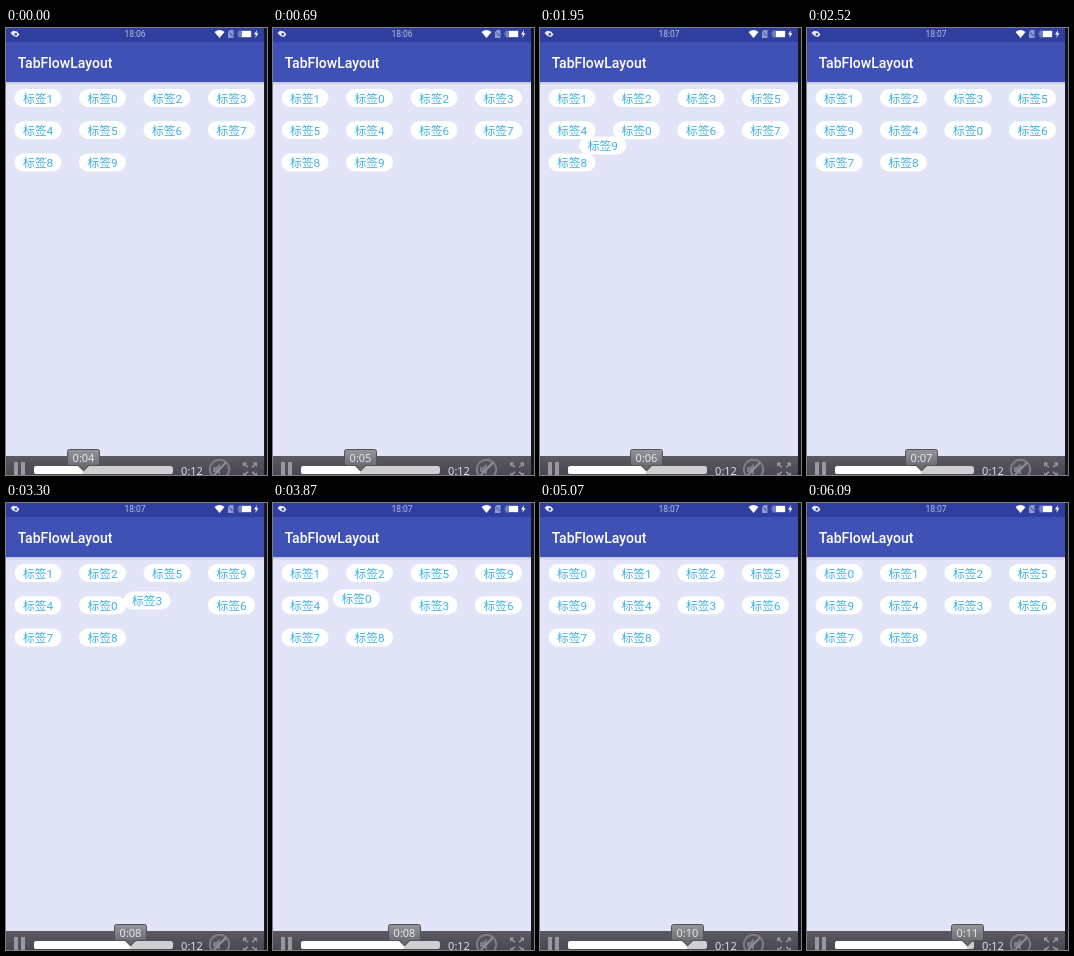
Write an HTML page with a canvas that moves like this. It is 261x447 px and loops after 6120 ms.

```html
<!DOCTYPE html>
<html lang="zh">
<head>
<meta charset="utf-8">
<title>TabFlowLayout</title>
<style>
html, body { margin: 0; width: 100%; height: 100%; overflow: hidden; background: #e1e5f7; }
canvas { display: block; width: 261px; height: 447px; }
</style>
</head>
<body>
<canvas id="stage"></canvas>
<script>
const W = 261, H = 447, LOOP = 6120;
const canvas = document.getElementById('stage');
const dpr = window.devicePixelRatio || 1;
canvas.width = Math.round(W * dpr);
canvas.height = Math.round(H * dpr);
const ctx = canvas.getContext('2d');
ctx.scale(dpr, dpr);

const CJK = 'Roboto, "Noto Sans CJK SC", "Noto Sans CJK", sans-serif';
const START = [1, 0, 2, 3, 4, 5, 6, 7, 8, 9];
// Each drag: tag, target slot, moment the others make room, path as [ms, x, y].
const DRAGS = [
  { tag: 5, to: 4, swap: 270, path: [[120, 96.5, 102], [480, 32, 102]] },
  { tag: 0, to: 5, swap: 920, path: [[720, 96.5, 70], [1220, 96.5, 102]] },
  { tag: 9, to: 4, swap: 1960, path: [[1620, 96.5, 134.4], [2260, 32, 102]] },
  { tag: 3, to: 6, swap: 3010, path: [[2760, 161, 70], [3080, 140, 94], [3300, 141, 97.5], [3480, 161, 102]] },
  { tag: 0, to: 0, swap: 3990, path: [[3720, 96.5, 102], [4240, 32, 70]] }
];
const SEEK = [[0, 77.5], [1380, 97.5], [2520, 114.6], [3300, 124.6], [4380, 137.5], [5070, 147.5], [6090, 160.5], [6120, 160.8]];

const clamp = v => Math.max(0, Math.min(1, v));
const smooth = v => v * v * (3 - 2 * v);
const mix = (a, b, k) => a + (b - a) * k;
const slot = i => ({ x: 32 + (i % 4) * 64.5, y: 70 + Math.floor(i / 4) * 32.2 });

let order = START;
for (const d of DRAGS) {
  d.before = order;
  order = order.filter(n => n !== d.tag);
  order.splice(d.to, 0, d.tag);
  d.after = order;
}

// Value list at time t along keyed points; ease shapes each span.
function along(points, t, ease) {
  if (t <= points[0][0]) return points[0].slice(1);
  for (let i = 1; i < points.length; i++) {
    const a = points[i - 1], b = points[i];
    if (t <= b[0]) {
      const k = ease((t - a[0]) / (b[0] - a[0]));
      return a.slice(1).map((v, j) => mix(v, b[j + 1], k));
    }
  }
  return points[points.length - 1].slice(1);
}

function rect(x, y, w, h, color) {
  ctx.fillStyle = color;
  ctx.fillRect(x, y, w, h);
}

function round(x, y, w, h, r, color) {
  ctx.beginPath();
  ctx.roundRect(x, y, w, h, r);
  ctx.fillStyle = color;
  ctx.fill();
}

function poly(points, color) {
  ctx.beginPath();
  points.forEach(p => ctx.lineTo(p[0], p[1]));
  ctx.closePath();
  ctx.fillStyle = color;
  ctx.fill();
}

function line(points, color, width) {
  ctx.beginPath();
  points.forEach(p => ctx.lineTo(p[0], p[1]));
  ctx.strokeStyle = color;
  ctx.lineWidth = width;
  ctx.stroke();
}

function text(str, x, y, font, color, align = 'center') {
  ctx.font = font;
  ctx.textAlign = align;
  ctx.fillStyle = color;
  ctx.fillText(str, x, y);
}

function fade(y0, y1, a, b) {
  const g = ctx.createLinearGradient(0, y0, 0, y1);
  g.addColorStop(0, a);
  g.addColorStop(1, b);
  return g;
}

function statusBar(t) {
  rect(0, 0, W, 14, '#303f9f');
  poly([[4.5, 5], [7, 2.8], [11, 3.6], [13.5, 6.5], [11, 9], [7.5, 8]], '#e8ebfa');
  ctx.beginPath();
  ctx.arc(9.8, 6.2, 1.2, 0, 7);
  ctx.fillStyle = '#303f9f';
  ctx.fill();

  text(t < 900 ? '18:06' : '18:07', 129, 9.3, '8.5px ' + CJK, '#b9c0e4');

  ctx.beginPath();
  ctx.moveTo(213.5, 10);
  ctx.lineTo(208.5, 4);
  ctx.quadraticCurveTo(213.5, 0, 218.5, 4);
  ctx.closePath();
  ctx.fillStyle = '#fff';
  ctx.fill();

  poly([[222, 4], [224, 2], [227.5, 2], [227.5, 10], [222, 10]], '#8d99cf');
  line([[223.5, 4.5], [226.5, 8]], '#303f9f', 1);
  round(232.5, 2.5, 13, 7, 1, '#7482c4');
  rect(236, 3, 9, 6, '#fff');
  rect(231.5, 4.5, 1, 3, '#7482c4');
  poly([[251, 2], [248, 6.5], [250, 6.5], [249.3, 10], [252.4, 5.2], [250.5, 5.2]], '#fff');
}

function header(t) {
  rect(0, 14, W, 40, '#3f51b5');
  statusBar(t);
  text('TabFlowLayout', 11.7, 39.5, '500 14px Roboto, sans-serif', '#fff', 'left');
  rect(0, 54, W, 3, fade(54, 57, 'rgba(90,90,110,.24)', 'rgba(90,90,110,0)'));
}

function pill(n, x, y) {
  round(x - 23.5, y - 9, 47, 18, 9, '#fff');
  text('标签' + n, x, y + 4.7, '11.8px ' + CJK, '#3fb3df');
}

function tags(t) {
  let cur = DRAGS[0];
  for (const d of DRAGS) if (t >= d.path[0][0]) cur = d;
  const k = 1 - Math.pow(1 - clamp((t - cur.swap) / 220), 2);
  for (const n of START) {
    if (n === cur.tag) continue;
    const a = slot(cur.before.indexOf(n)), b = slot(cur.after.indexOf(n));
    pill(n, mix(a.x, b.x, k), mix(a.y, b.y, k));
  }
  pill(cur.tag, ...along(cur.path, t, smooth));
}

function icons() {
  const grey = '#9a979f', dim = '#7f7c85';
  rect(8, 434, 4, 13, grey);
  rect(15, 434, 4, 13, grey);

  ctx.beginPath();
  ctx.arc(213.5, 441.5, 9.7, 0, 7);
  ctx.strokeStyle = dim;
  ctx.lineWidth = 2;
  ctx.stroke();
  poly([[207, 439], [210, 439], [214, 435.5], [214, 447], [210, 444], [207, 444]], dim);
  line([[207, 448], [220, 434.5]], '#918e97', 2);

  for (const sx of [-1, 1]) for (const sy of [-1, 1]) {
    const p = (x, y) => [244 + sx * x, 441.5 + sy * y];
    line([p(2.2, 2.2), p(6, 6)], grey, 1.6);
    poly([p(7, 7), p(2.7, 7), p(7, 2.7)], grey);
  }
}

function player(t) {
  const pos = along(SEEK, t, v => v)[0];
  const sec = Math.floor((pos - 28) / 11.6 + 0.06);
  const x = Math.floor(pos) + 0.5;
  const font = '11px "Open Sans", sans-serif';
  rect(0, 428, 258, 19, fade(428, 447, '#5b5963', '#4b4751'));
  icons();
  round(28, 438, 139, 8, 2.5, '#d0ced2');
  round(28, 438, x - 28, 8, 2.5, '#fff');
  text('0:12', 186, 446.6, font, '#dfe7f5');

  ctx.beginPath();
  ctx.roundRect(x - 16, 421.5, 32, 16, 2);
  ctx.fillStyle = fade(421, 438, '#94979c', '#6b6d73');
  ctx.fill();
  ctx.strokeStyle = '#505258';
  ctx.lineWidth = 1;
  ctx.stroke();
  poly([[x - 6, 437.5], [x + 6, 437.5], [x, 443.5]], '#55575d');
  poly([[x - 4.5, 437], [x + 4.5, 437], [x, 441.8]], '#6b6d73');
  text('0:' + String(sec).padStart(2, '0'), x, 433.6, font, '#eceef2');
}

function draw(t) {
  rect(0, 0, W, H, '#e1e5f7');
  header(t);
  tags(t);
  rect(258, 0, 3, H, '#15151d');
  player(t);
}

let begin;
function tick(now) {
  if (begin === undefined) begin = now;
  draw((now - begin) % LOOP);
  requestAnimationFrame(tick);
}
draw(0);
requestAnimationFrame(tick);
</script>
</body>
</html>
```
